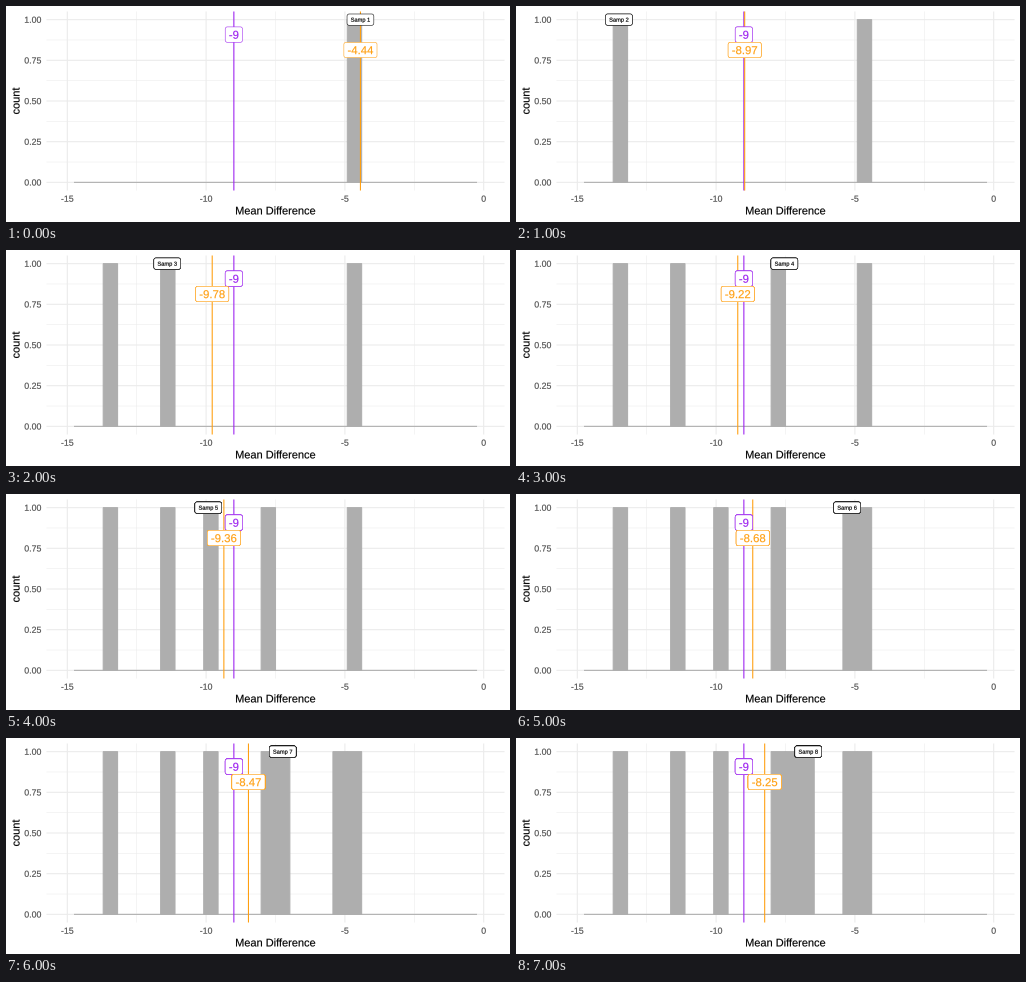
Write a matplotlib script that moves like this. It is 504 px wide and 216 px high and loops after 8000 ms.

```python
import matplotlib.pyplot as plt
import numpy as np
from matplotlib.animation import FuncAnimation
from matplotlib.patches import FancyBboxPatch, PathPatch, Rectangle
from matplotlib.textpath import TextPath
from matplotlib.transforms import Affine2D

W, H = 504, 216
LEFT, RIGHT, TOP, BOTTOM = 40.5, 498.5, 5.5, 184.5
GRAY, GRID = "#aeaeae", "#ebebeb"
PURPLE, ORANGE = "#9c20f0", "#ff9f0f"
THIN, LINE = 0.53, 1.07
PAD, RADIUS = 3.6, 2.16
FONT = {"family": "Liberation Sans"}

SAMPLES = np.array([-4.44, -13.50, -11.40, -7.54, -9.92, -5.28, -7.24, -6.68])
TRUE_MEAN = -9
BIN = 15 / 29
EDGES = -15 + BIN / 2 + BIN * np.arange(29)

# Glyph advances in em; anything missing is 0.556
ADVANCE = {"-": .333, ".": .278, " ": .278, "S": .667, "m": .833, "M": .833,
           "D": .722, "i": .222, "f": .278, "r": .333, "c": .5, "t": .278}

fig = plt.figure(figsize=(W / 72, H / 72), dpi=72, facecolor="white")
ax = fig.add_axes([0, 0, 1, 1])
ax.set(xlim=(0, W), ylim=(H, 0))
ax.axis("off")


def px(value):
    return LEFT + (value + 15.75) / 16.5 * (RIGHT - LEFT)


def py(count):
    return BOTTOM - (count + 0.05) / 1.1 * (BOTTOM - TOP)


def text_width(s, size):
    return size * sum(ADVANCE.get(ch, .556) for ch in s)


def text(x, baseline, s, size, color, align=0.5, angle=0, z=1):
    """Outline text; align is the share of its width left of x."""
    path = TextPath((-align * text_width(s, size), 0), s, size=size, prop=FONT)
    move = Affine2D().scale(1, -1).rotate_deg(-angle).translate(x, baseline)
    return ax.add_patch(PathPatch(move.transform_path(path), fc=color, ec=color,
                                  lw=0.15, snap=False, zorder=z))


def line(xs, ys, color, width, z):
    return ax.plot(xs, ys, color=color, lw=width, zorder=z, snap=False,
                   solid_capstyle="butt")[0]


def vline(value, color, width=LINE, z=4):
    x = px(value)
    return line([x, x], [TOP, BOTTOM], color, width, z)


def hline(count, width):
    y = py(count)
    return line([LEFT, RIGHT], [y, y], GRID, width, 0)


def label(x, y, s, size, color, z, copies):
    """Rounded label; stacked copies strengthen its thin border."""
    w = text_width(s, size) + 2 * PAD
    h = 0.72 * size + 2 * PAD
    style = f"round,pad=0,rounding_size={RADIUS}"
    parts = [ax.add_patch(FancyBboxPatch((x - w / 2, y - h / 2), w, h,
                                         boxstyle=style, fc="white", ec=color,
                                         lw=THIN, snap=False, zorder=z))
             for _ in range(copies)]
    parts.append(text(x, y + 0.36 * size, s, size, color, z=z + 0.5))
    return parts


def draw_axes():
    for v in (-12.5, -7.5, -2.5):
        vline(v, GRID, THIN, 0)
    for c in np.arange(0.125, 1, 0.25):
        hline(c, THIN)
    for v in range(-15, 1, 5):
        vline(v, GRID, LINE, 0)
        text(px(v), 195.7, str(v), 8.8, "#4d4d4d")
    for c in np.arange(0, 1.1, 0.25):
        hline(c, LINE)
        text(35.4, py(c) + 3.15, f"{c:.2f}", 8.8, "#4d4d4d", align=1)
    text((LEFT + RIGHT) / 2, 208.4, "Mean Difference", 11, "black")
    text(13.5, (TOP + BOTTOM) / 2, "count", 11, "black", angle=90)


def draw_bars(values):
    counts, _ = np.histogram(values, EDGES)
    parts = [line([px(EDGES[0]) - 0.5, px(EDGES[-1]) + 0.5], [py(0)] * 2,
                  GRAY, LINE, 2)]
    for left, n in zip(EDGES, counts):
        if n:
            parts.append(ax.add_patch(Rectangle(
                (px(left), py(n)), px(left + BIN) - px(left), py(0) - py(n),
                fc=GRAY, ec=GRAY, lw=LINE, snap=False, zorder=3)))
    return parts


draw_axes()
shown = []


def update(i):
    while shown:
        shown.pop().remove()
    n = i + 1
    values = SAMPLES[:n]
    mean = values.mean()
    shown.extend(draw_bars(values))
    shown.append(vline(TRUE_MEAN, PURPLE))
    shown.append(vline(mean, ORANGE, z=5))
    shown.extend(label(px(TRUE_MEAN), 28.6, str(TRUE_MEAN), 11.38, PURPLE, 6, n))
    shown.extend(label(px(mean), 44, f"{mean:.2f}", 11.38, ORANGE, 7, n))
    shown.extend(label(px(values[-1]), py(1), f"Samp {n}", 5.69, "black", 8, n))
    return shown


anim = FuncAnimation(fig, update, frames=len(SAMPLES), interval=1000,
                     repeat=True, repeat_delay=0, blit=False)
plt.show()
```
